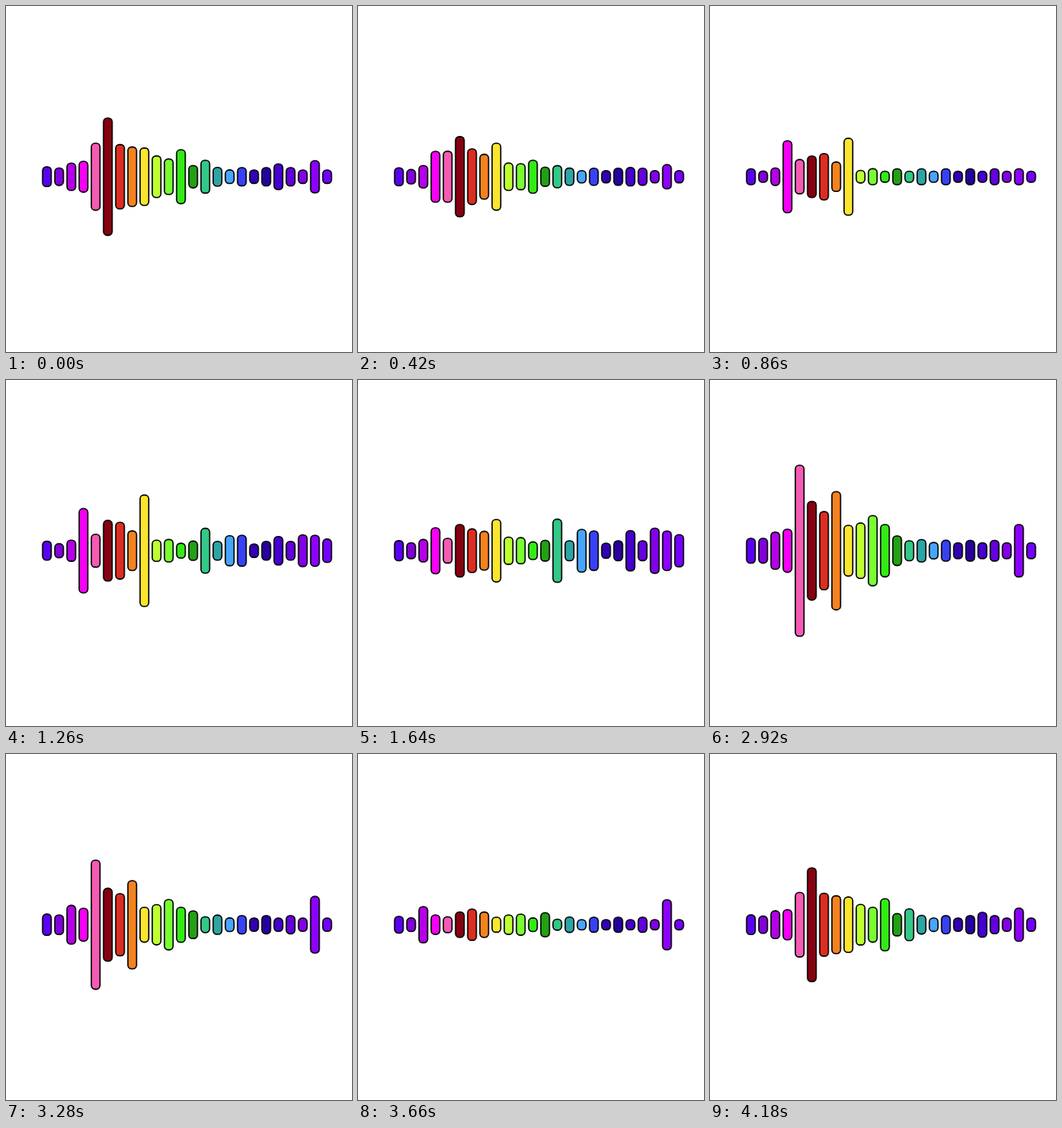
An HTML page with a canvas for the animation above (4.2 s loop, 426 px wide and 426 px high).

```html
<!DOCTYPE html>
<html>
<head>
<meta charset="utf-8">
<style>
html, body { margin: 0; width: 100%; height: 100%; overflow: hidden; background: #fff; }
canvas { display: block; width: 100vmin; height: 100vmin; }
</style>
</head>
<body>
<canvas id="stage" width="426" height="426"></canvas>
<script>
const LOOP = 4200, MID = 210.2, FIRST = 50.4, STEP = 15, WIDTH = 10.6, LINE = 1.6;
const ctx = document.getElementById('stage').getContext('2d');

const palette = ('5a00f0 8200dc b400e6 f500f5 f55ab4 870010 dc2d20 f5821e fae62d beff32 78ff32 32eb14 ' +
  '23a014 32c887 2da5a5 46a5ff 3741f5 3200b4 2800a0 4600d2 6400dc 8200e6 8c00ff 7300ff').split(' ');

// Each pose is a quiet floor, one broad hump and a few solo bars.
// power shapes the move to the next pose, swell lifts the tall bars on the way.
const poses = [
  { at: 0, power: 1, swell: 0, floor: 21, hump: [6.5, 58, 3.5],
    solo: { 4: 84, 5: 146, 11: 68, 13: 42, 19: 33, 22: 41 } },
  { at: 860, power: 1, swell: 0.6, floor: 18, hump: [5.5, 40, 2], solo: { 3: 90, 8: 96 } },
  { at: 1640, power: 1, swell: 0.74, floor: 23, hump: [6.5, 30, 3],
    solo: { 3: 58, 4: 32, 5: 66, 8: 78, 13: 79, 15: 54, 16: 50, 19: 51, 21: 57, 22: 50, 23: 41 } },
  { at: 2200, power: 3, swell: 0, floor: 17, hump: [4, 9, 3], solo: { 3: 38, 8: 105, 15: 25, 16: 29, 22: 34 } },
  { at: 2920, power: 1, swell: 0.35, floor: 24, hump: [6.5, 72, 4],
    solo: { 4: 212, 5: 123, 7: 147, 8: 64, 10: 88, 11: 66, 22: 66 } },
  { at: 3660, power: 1.5, swell: 0.1, floor: 17, hump: [6, 20, 4],
    solo: { 2: 46, 4: 21, 8: 20, 12: 31, 22: 63 } }
];
poses.push({ ...poses[0], at: LOOP });

function poseHeight({ floor, hump: [center, rise, spread], solo }, i) {
  const ripple = i % 2 ? -3 : 3;
  return solo[i] ?? floor + ripple + rise * Math.exp(-(((i - center) / spread) ** 2));
}

function heightsAt(t) {
  const n = poses.findIndex(pose => pose.at > t);
  const a = poses[n - 1], b = poses[n];
  const p = (t - a.at) / (b.at - a.at);
  const heights = palette.map((_, i) => {
    const from = poseHeight(a, i);
    return from + (poseHeight(b, i) - from) * p ** a.power;
  });
  const top = Math.max(...heights);
  const lift = a.swell * Math.sin(Math.PI * p);
  return heights.map(h => h * (1 + lift * (h / top) ** 2));
}

function draw(t) {
  ctx.fillStyle = '#fff';
  ctx.fillRect(0, 0, 426, 426);
  ctx.strokeStyle = '#000';
  ctx.lineWidth = LINE;
  heightsAt(t).forEach((h, i) => {
    const inner = h - LINE;
    ctx.beginPath();
    ctx.roundRect(FIRST + i * STEP - WIDTH / 2, MID - inner / 2, WIDTH, inner, 4.5);
    ctx.fillStyle = '#' + palette[i];
    ctx.fill();
    ctx.stroke();
  });
}

function tick() {
  draw(performance.now() % LOOP);
  requestAnimationFrame(tick);
}
tick();
</script>
</body>
</html>
```
